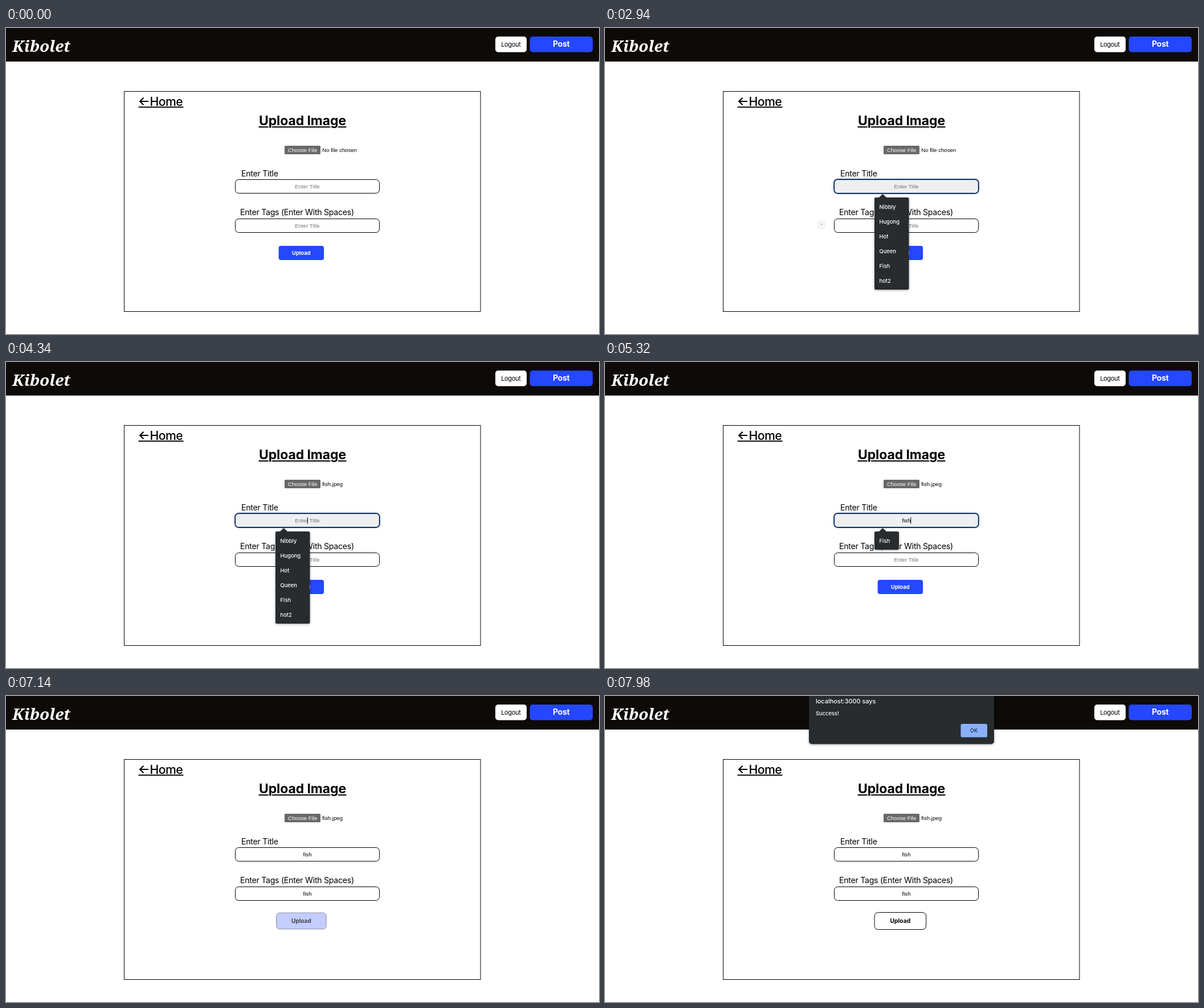
Animation, 1041 px wide and 538 px high, one loop 8 s. Source, as an HTML page:

```html
<!DOCTYPE html>
<html lang="en">
<head>
<meta charset="utf-8">
<title>Upload form</title>
<style>
  html, body { margin: 0; width: 100%; height: 100%; overflow: hidden; background: #fff; }
  svg { display: block; width: 1041px; height: 538px; }
  text { font-family: Inter, "Open Sans", sans-serif; white-space: pre; }
  .form { font-family: "Liberation Sans", Arial, sans-serif; font-size: 9.64px; }
  .mid { text-anchor: middle; }
  .label { font-size: 14.2px; letter-spacing: -.3px; }
  .item { font-size: 9.4px; font-weight: 500; fill: #fff; }
  .box { fill: #fff; stroke: #000; }
  .dark { fill: #282c2f; }
  .shadow { filter: drop-shadow(0 1px 2px rgba(0, 0, 0, .35)); }
</style>
</head>
<body>
<svg viewBox="0 0 1041 538">
  <rect width="1041" height="59" fill="#0d0a07"/>
  <text x="11" y="41.5" fill="#fff" style="font:italic 700 28px 'Noto Serif',serif">Kibolet</text>
  <rect x="859" y="15" width="55" height="27.5" rx="5" fill="#fff"/>
  <text class="mid" x="886.3" y="33" font-size="11" letter-spacing="-.33">Logout</text>
  <rect x="919.5" y="15" width="110.5" height="27.5" rx="5" fill="#2447ff"/>
  <text class="mid" x="974.6" y="33" font-size="14" font-weight="700" letter-spacing="-.3" fill="#fff">Post</text>

  <rect class="box" x="207.5" y="111.5" width="625.5" height="387"/>
  <path d="M250 129H235M241.5 122.8L235.2 129L241.5 135.2" fill="none" stroke="#000" stroke-width="2.2"/>
  <text x="252.6" y="136.6" font-size="21.2" font-weight="500" letter-spacing="-.55">Home</text>
  <rect x="232.5" y="138.2" width="79" height="1.9"/>
  <rect x="443.5" y="173" width="154" height="2"/>
  <text class="mid" x="520.5" y="170.7" font-size="23" font-weight="700" letter-spacing="-.1"
        stroke="#fff" stroke-width="3" paint-order="stroke">Upload Image</text>

  <g id="form">
    <g id="picker">
      <rect/>
      <text class="form"></text>
      <text class="form"></text>
    </g>
    <text class="label" x="413" y="260.5">Enter Title</text>
    <text class="label" x="411" y="329">Enter Tags (Enter With Spaces)</text>
    <g id="fields"></g>
    <rect id="button"/>
    <text id="caption" class="mid" x="518.3" font-weight="700">Upload</text>
  </g>

  <g id="popup" class="shadow">
    <path class="dark" d="M480.5 298.5L487.5 292L494.5 298.5Z"/>
    <rect class="dark" x="473" y="298" rx="2.5"/>
    <g id="items"></g>
  </g>

  <g id="drag" opacity=".6">
    <rect x="-5.5" y="-6.5" width="11" height="13" rx="2" fill="#f6f6f6" stroke="#d5d5d5" stroke-width=".8"/>
    <rect x="-4" y="-4" width="8" height="6" rx="1" fill="#fff" stroke="#d0d0d0" stroke-width=".6"/>
    <ellipse cy="-1" rx="2" ry="1.1" fill="#777"/>
  </g>

  <g id="dialog" class="shadow">
    <rect class="dark" x="358" y="-12" width="325" height="96.5" rx="5"/>
    <text x="370" y="13" font-size="10.9" font-weight="500" fill="#fff">localhost:3000 says</text>
    <text x="370" y="34" font-size="9.4" font-weight="500" fill="#fff">Success!</text>
    <rect x="624.5" y="49" width="46.5" height="23.5" rx="2.5" fill="#8ab0f8"/>
    <text class="mid" x="647.6" y="64" font-size="9" font-weight="500" fill="#202b3c">OK</text>
  </g>
</svg>

<script>
const LOOP = 8000, STEP = 70, FIELD_GAP = 69, CENTER = 529;
const WORDS = ["Nibbly", "Hugong", "Hot", "Queen", "Fish", "hot2"];
const $ = id => document.getElementById(id);

// Each track lists [time, value]; the value holds until the next time.
const tracks = {
  focus:  [[0, -1], [910, 0], [4060, -1], [4340, 0], [5740, 1], [7000, -1]],
  popup:  [[0, ""], [910, "all"], [4060, ""], [4340, "all"], [4620, "one"],
           [5740, ""], [5810, "all"], [6020, "one"], [7000, ""]],
  caret:  [[0, 0], [910, 1], [1470, 0], [1960, 1], [2520, 0], [4340, 1], [7000, 0]],
  title:  [[0, 0], [4620, 1], [4900, 2], [5110, 3], [5320, 4]],
  tags:   [[0, 0], [6020, 1], [6230, 2], [6370, 3], [6440, 4]],
  picker: [[0, "empty"], [3780, "drop"], [3850, "full"]],
  dialog: [[0, 0], [7350, .5], [7420, .85], [7490, 1]]
};
const dragPath = [[2520, 294, 427], [2940, 380, 346], [3640, 520, 214]];

const valueAt = (track, t) => track.filter(k => k[0] <= t).pop()[1];
const mix = (a, b, p) => a + (b - a) * p;

function make(tag, parent, attrs = {}) {
  const el = document.createElementNS("http://www.w3.org/2000/svg", tag);
  parent.append(el);
  return set(el, attrs);
}
function set(el, attrs) {
  for (const k in attrs) el.setAttribute(k, attrs[k]);
  return el;
}
const show = (el, on) => el.setAttribute("visibility", on ? "visible" : "hidden");

const fields = [0, 1].map(i => {
  const g = make("g", $("fields"), { transform: `translate(0 ${i * FIELD_GAP})` });
  return {
    box: make("rect", g, { class: "box", x: 402.5, y: 266.5, width: 253, height: 24, rx: 6 }),
    glow: make("rect", g, { x: 403.3, y: 267.3, width: 251.4, height: 22.4, rx: 5.5, fill: "none", stroke: "#a6c2ee" }),
    ring: make("rect", g, { x: 401.8, y: 265.8, width: 254.4, height: 25.4, rx: 6.6, fill: "none", stroke: "#17386e", "stroke-width": 1.4 }),
    text: make("text", g, { class: "form mid", x: CENTER, y: 282 }),
    caret: make("rect", g, { y: 273, width: 1, height: 11.5 })
  };
});
const items = WORDS.map((_, i) => make("text", $("items"), { class: "item", x: 481.5, y: 317.5 + i * 26 }));

function drawField(field, typed, focused, caretOn) {
  field.text.textContent = typed ? "fish".slice(0, typed) : "Enter Title";
  set(field.text, { fill: typed ? "#000" : "#757575" });
  set(field.box, { style: `fill:${focused ? "#efefef" : "#fff"}` });
  show(field.glow, focused);
  show(field.ring, focused);
  show(field.caret, focused && caretOn);
  const half = typed ? field.text.getComputedTextLength() / 2 : 0;
  set(field.caret, { x: CENTER + half - .2 });
}

function drawPopup(mode, focus) {
  const words = mode === "one" ? ["Fish"] : WORDS;
  show($("popup"), mode);
  set($("popup"), { transform: `translate(0 ${Math.max(focus, 0) * FIELD_GAP})` });
  set($("popup").children[1], { width: mode === "one" ? 43 : 60.5, height: words.length * 26 + 6 });
  items.forEach((el, i) => el.textContent = words[i] || "");
}

function drawPicker(mode) {
  const [box, name, file] = $("picker").children;
  const drop = mode === "drop";
  set(box, drop
    ? { x: 489.5, y: 208.9, width: 61, height: 12.6, rx: 2.5, fill: "#fff", stroke: "#000" }
    : { x: 489, y: 207, width: 63, height: 15, rx: 1.5, fill: "#696969", stroke: "none" });
  set(name, { x: drop ? 494 : 495, y: drop ? 218.5 : 218, fill: drop ? "#000" : "#fff" });
  set(file, { x: drop ? 553.5 : 555.2, y: drop ? 218.5 : 218 });
  name.textContent = "Choose File";
  file.textContent = mode === "empty" ? "No file chosen" : "fish.jpeg";
  set($("form"), { transform: `translate(0 ${drop ? -1.5 : 0})` });
}

// Solves the CSS "ease" curve, cubic-bezier(.25, .1, .25, 1).
function ease(x) {
  const curve = (a, b, s) => 3 * a * s * (1 - s) ** 2 + 3 * b * s * s * (1 - s) + s ** 3;
  let lo = 0, hi = 1;
  for (let i = 0; i < 20; i++) {
    const s = (lo + hi) / 2;
    if (curve(.25, .25, s) < x) lo = s; else hi = s;
  }
  return curve(.1, 1, lo);
}

function drawButton(t) {
  const p = ease(Math.min(Math.max((t - 7005) / 310, 0), 1));
  const w = mix(79.5, 90.6, p), h = mix(25, 30, p);
  const ink = mix(255, 0, p);
  set($("button"), {
    x: 518.4 - w / 2, y: 395.5 - h / 2, width: w, height: h, rx: mix(4, 6.5, p),
    fill: `rgb(${mix(36, 255, p)},${mix(71, 255, p)},255)`,
    stroke: "#000", "stroke-opacity": p * p, "stroke-width": p
  });
  set($("caption"), { y: mix(399, 399.4, p), "font-size": mix(9.4, 10.3, p), fill: `rgb(${ink},${ink},${ink})` });
}

function drawDrag(t) {
  const i = t < dragPath[1][0] ? 0 : 1;
  const [t0, x0, y0] = dragPath[i], [t1, x1, y1] = dragPath[i + 1];
  const p = (t - t0) / (t1 - t0);
  show($("drag"), t >= dragPath[0][0] && t <= dragPath[2][0]);
  set($("drag"), { transform: `translate(${mix(x0, x1, p)} ${mix(y0, y1, p)})` });
}

function draw(now) {
  const t = Math.floor(now % LOOP / STEP) * STEP;
  const s = {};
  for (const k in tracks) s[k] = valueAt(tracks[k], t);
  drawPicker(s.picker);
  drawField(fields[0], s.title, s.focus === 0, s.caret);
  drawField(fields[1], s.tags, s.focus === 1, s.caret);
  drawPopup(s.popup, s.focus);
  drawButton(t);
  drawDrag(t);
  set($("dialog"), { opacity: s.dialog });
}

const start = performance.now();
function frame() {
  draw(performance.now() - start);
  requestAnimationFrame(frame);
}
frame();
</script>
</body>
</html>
```
